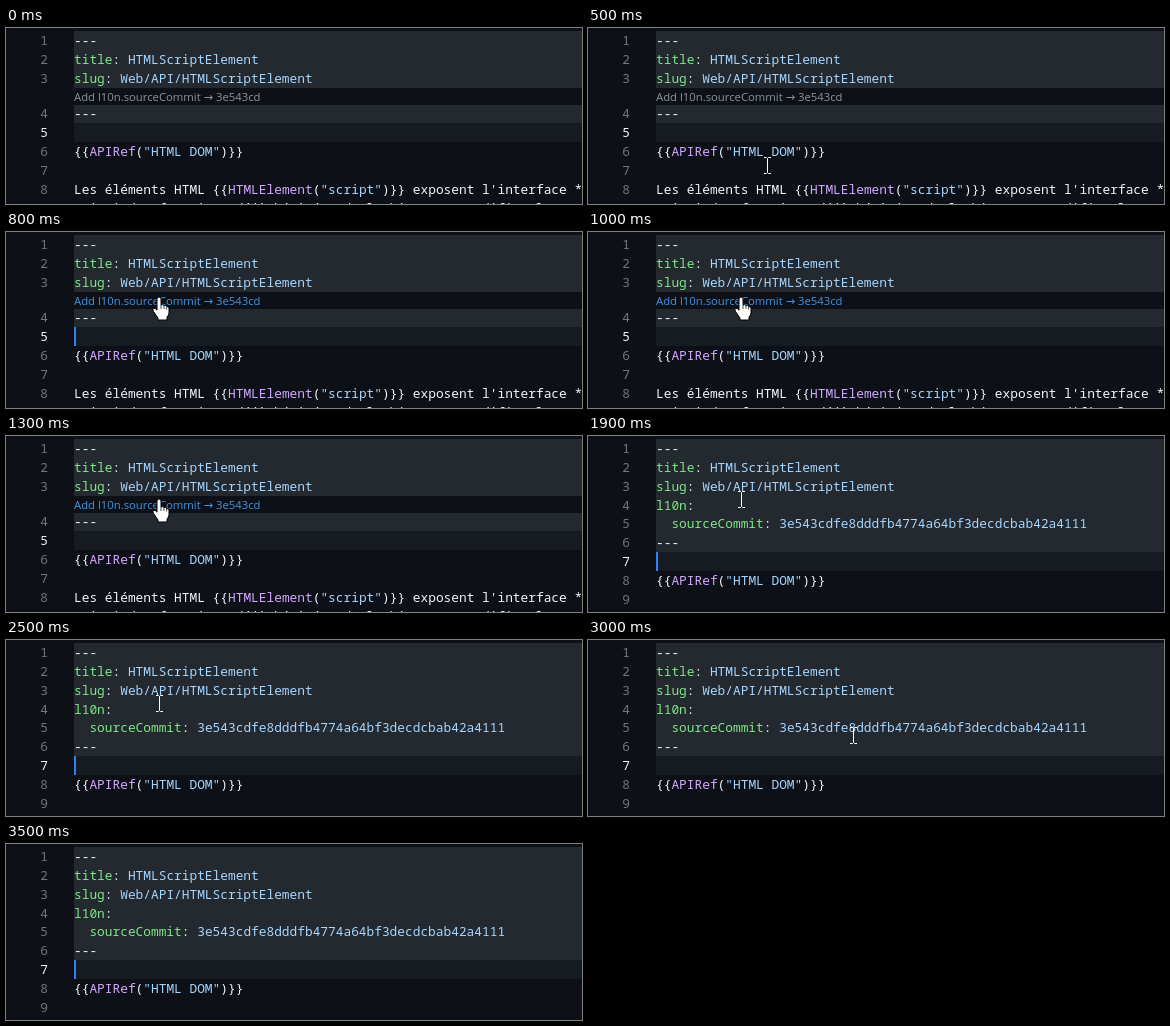
These frames come from a looping animation (576x176 px, 3900 ms). An HTML page with a canvas:

```html
<!DOCTYPE html>
<html lang="en">
<head>
<meta charset="utf-8">
<title>Code lens insertion</title>
<style>
  html, body { margin: 0; width: 576px; height: 176px; overflow: hidden; background: #0d1117; }
  canvas { display: block; }
</style>
</head>
<body>
<canvas id="stage" width="576" height="176"></canvas>
<script>
const ctx = document.getElementById('stage').getContext('2d');

const LOOP = 3900, STEP = 100, INSERT = 1900;
const LEFT = 68, TOP = 3, PITCH = 18.85, LENS_HEIGHT = 16.8, CHAR = 7.7;
const CODE_FONT = '500 12.83px "Noto Sans Mono", "DejaVu Sans Mono", monospace';
const LENS_FONT = '11.3px "Open Sans", "DejaVu Sans", sans-serif';

const BACK = '#0d1117', MATTER = '#24282f';
const PLAIN = '#f0f6fc', KEY = '#7ee787', VALUE = '#a5d6ff', CALL = '#d2a8ff';

const entry = (key, value = '') => [[KEY, key], [PLAIN, ': '], [VALUE, value]];
const macro = (name, arg) =>
  [[PLAIN, '{{'], [CALL, name], [PLAIN, '('], [VALUE, `"${arg}"`], [PLAIN, ')}}']];
const plain = text => [[PLAIN, text]];

const head = [plain('---'), entry('title', 'HTMLScriptElement'), entry('slug', 'Web/API/HTMLScriptElement')];
const added = [entry('l10n'), entry('  sourceCommit', '3e543cdfe8dddfb4774a64bf3decdcbab42a4111')];
const tail = [
  plain('---'), [], macro('APIRef', 'HTML DOM'), [],
  [...plain('Les éléments HTML '), ...macro('HTMLElement', 'script'), ...plain(" exposent l'interface **")],
  plain("(ainsi des fonctions déjà héritées de l'objet pour modifier le comportement"),
];
const before = [...head, ...tail], after = [...head, ...added, ...tail];

// Pointer hot spot: time, x, y
const enter = [[100, 424, 166], [200, 345, 156], [300, 268, 147], [400, 206, 140],
  [500, 179, 137], [800, 153, 65], [1200, 153, 65], [1300, 153, 63]];
const leave = [[2900, 153, 63], [3200, 490, 160]];

function along(path, t) {
  const i = path.findIndex(p => p[0] > t);
  if (i < 0) return path[path.length - 1].slice(1);
  const [t0, x0, y0] = path[i - 1], [t1, x1, y1] = path[i];
  const k = (t - t0) / (t1 - t0);
  return [x0 + (x1 - x0) * k, y0 + (y1 - y0) * k];
}

function write(text, x, y, color, font = CODE_FONT, align = 'left') {
  ctx.font = font;
  ctx.fillStyle = color;
  ctx.textAlign = align;
  ctx.fillText(text, x, y);
}

function box(x, y, w, h, color) {
  ctx.fillStyle = color;
  ctx.fillRect(x, y, w, h);
}

function drawEditor(t, hover) {
  const inserted = t >= INSERT;
  const lines = inserted ? after : before;
  const active = inserted ? 6 : 4;
  const baseline = i => 17 + i * PITCH + (!inserted && i > 2 ? LENS_HEIGHT : 0);
  const top = Math.floor(baseline(active) - 13.5);

  box(0, 0, 576, 176, BACK);
  box(LEFT, TOP, 508, top - TOP, MATTER);
  box(LEFT, top, 508, 19, '#161b22');

  if (!inserted) {
    box(LEFT, 60, 508, 17, BACK);
    write('Add l10n.sourceCommit → 3e543cd', LEFT, 73, hover ? '#4493e0' : '#8b949e', LENS_FONT);
  }

  lines.forEach((line, i) => {
    const y = Math.round(baseline(i));
    write(i + 1, 42, y, i === active ? PLAIN : '#6e7681', CODE_FONT, 'right');
    let x = LEFT;
    for (const [color, text] of line) {
      write(text, x, y, color);
      x += text.length * CHAR;
    }
  });

  const caretOn = t >= 600 && Math.floor(t / 500) % 2 === 1;
  if (caretOn) box(LEFT, top, 2, 19, '#2f81f7');
}

function drawBeam(x, y) {
  ctx.strokeStyle = '#fff';
  ctx.lineWidth = 1;
  ctx.stroke(new Path2D(`M${Math.round(x) + .5} ${Math.round(y)}
    m-3.5 -7.5h2.5l1 1l1 -1h2.5 m-3.5 1v14 m-3.5 1h2.5l1 -1l1 1h2.5`));
}

const hand = new Path2D(`M-2 2 Q-2 0 0 0 T2 2 V8 Q4 6.8 5 8.6 Q7 7.8 7.6 9.6
  Q10 9 10 11.5 V16 Q10 18 8 20 V23 H-1 V21 L-5.5 14.5 Q-6.8 12.2 -5.2 11.4 Q-3.8 10.8 -2 13.2 Z`);
const knuckles = new Path2D('M2 8V12 M5 9V12 M7.6 10V12.5');

function drawHand(x, y) {
  ctx.save();
  ctx.translate(x, y);
  ctx.fillStyle = '#fff';
  ctx.strokeStyle = '#000';
  ctx.lineWidth = 1;
  ctx.fill(hand);
  ctx.stroke(hand);
  ctx.lineWidth = .7;
  ctx.stroke(knuckles);
  ctx.restore();
}

function frame() {
  const t = Math.floor((performance.now() - start) % LOOP / STEP) * STEP;
  const visible = t >= 100 && t < 3200;
  const [x, y] = along(t < 2900 ? enter : leave, Math.max(t, 100));
  const hover = visible && t < INSERT && y > 60 && y < 78 && x < 257;

  drawEditor(t, hover);
  if (visible) (hover ? drawHand : drawBeam)(x, y);
  requestAnimationFrame(frame);
}

const start = performance.now();
frame();
</script>
</body>
</html>
```
